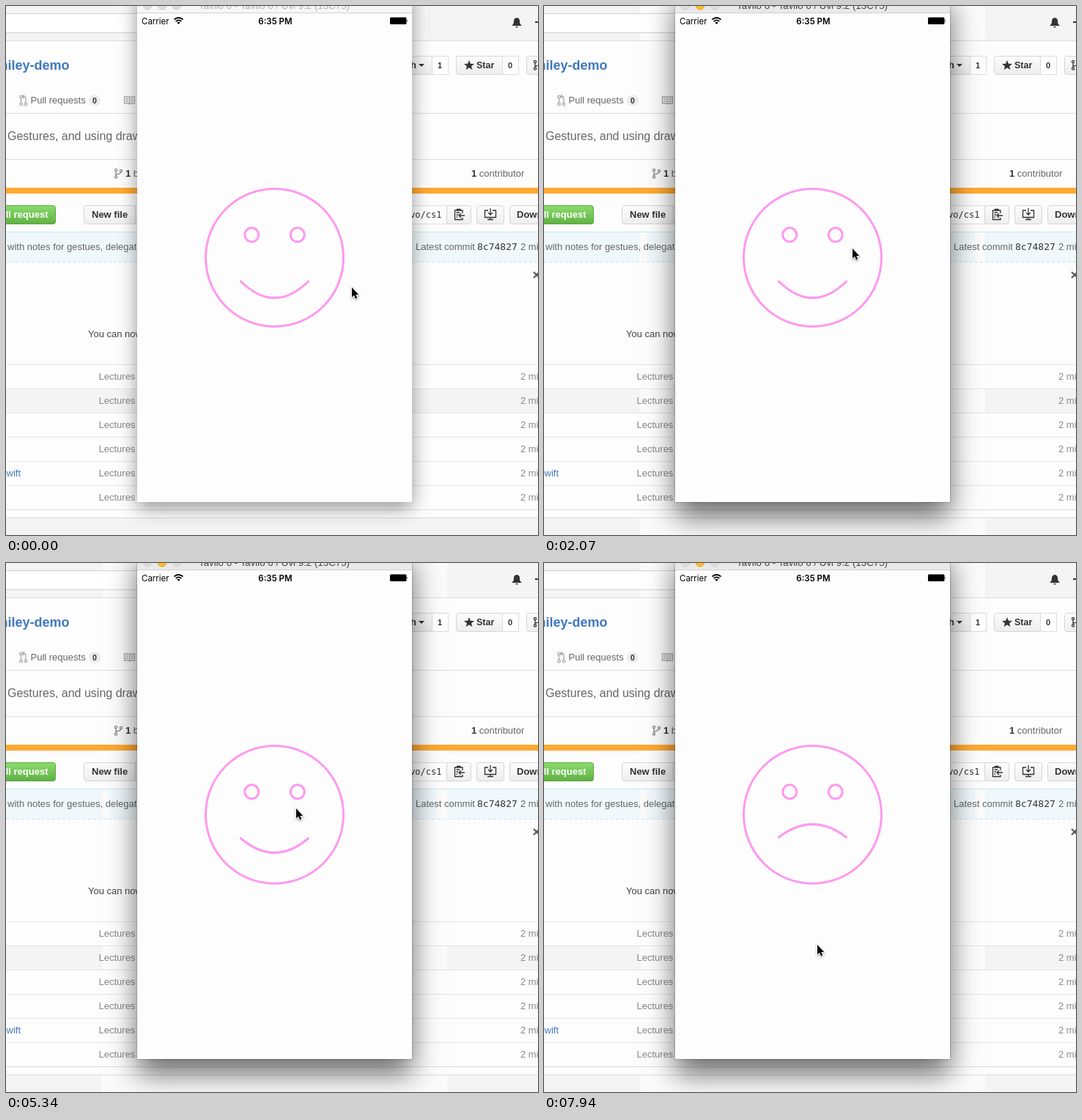
Recreate the animation shown at these times as an HTML page. Size 726 px wide and 722 px high, loop 8 s.

```html
<!DOCTYPE html>
<html lang="en">
<head>
<meta charset="utf-8">
<title>Smiley gesture demo</title>
<style>
html, body { margin: 0; width: 100%; height: 100%; overflow: hidden; background: #fdfdfd; }
svg { position: absolute; left: 0; top: 0; }
text { font: 13px "Liberation Sans", sans-serif; fill: #666; white-space: pre; }
.b { font-weight: bold; fill: #333; }
.s { font-size: 12px; }
.mono { font-family: "DejaVu Sans Mono", monospace; fill: #333; }
.blue { fill: #4078c0; }
.btn { fill: url(#btn); stroke: #d5d5d5; }
.box { fill: #fff; stroke: #ddd; }
.icon { fill: none; stroke: #333; stroke-width: 1.3; }
.dim { stroke: #aaa; }
.rule { fill: none; stroke: #e5e5e5; }
.status { font: 11.5px Inter, sans-serif; fill: #000; }
.face { fill: none; stroke: #ff98f0; stroke-width: 3; }
#shadow { position: absolute; left: 179px; top: -20px; width: 375px; height: 697px; box-shadow: 0 8px 24px rgba(0,0,0,.42); }
.active #shadow { box-shadow: 0 20px 36px rgba(0,0,0,.58), 0 0 2px rgba(0,0,0,.4); }
#bands, .active .idle { display: none; }
.active #bands { display: inline; }
#bar { fill: #f6f6f6; }
.active #bar { fill: #e9e9e9; }
#title { fill: #b0b0b0; }
.active #title { fill: #444; }
.light { fill: #dcdcdc; stroke: #cfcfcf; }
.active #amber { fill: #ffbd2e; stroke: #e2a21f; }
</style>
</head>
<body>
<svg width="726" height="722">
  <defs>
    <linearGradient id="btn" x2="0" y2="1"><stop stop-color="#fcfcfc"/><stop offset="1" stop-color="#eee"/></linearGradient>
    <linearGradient id="green" x2="0" y2="1"><stop stop-color="#8add6d"/><stop offset="1" stop-color="#60b044"/></linearGradient>
    <g id="branch"><path d="M2 3V10M9 4Q9 7 2 8"/><circle cx="2" cy="2" r="1.6"/><circle cx="9" cy="3" r="1.6"/><circle cx="2" cy="11.5" r="1.6"/></g>
  </defs>

  <!-- browser toolbar -->
  <path fill="#f4f4f4" d="M0 0H726V47H0ZM0 699H726V722H0ZM0 523H726V555H0Z"/>
  <path fill="#f0f8fb" d="M0 309H726V349H0Z"/>
  <path id="bands" fill="#fbfbfb" d="M131 0H602V47H131ZM131 523H602V555H131ZM131 699H602V722H131ZM131 309H140V349H131ZM588 309H602V349H588Z"/>
  <path class="idle" fill="#f8f8f8" d="M152 0H575V47H152Z"/>
  <rect class="box" x="-5" y="10.500" width="220" height="26" style="stroke:#d0d0d0"/>
  <path d="M690 27Q693 25 693 20.500Q693 16.500 697 16Q701 16.500 701 20.500Q701 25 704 27ZM695 28H699Q697 31 695 28Z" fill="#333"/>
  <path d="M722 22H726" stroke="#333" stroke-width="2"/>

  <!-- repository header -->
  <text class="b blue" x="86.500" y="87" text-anchor="end" style="font-size:18px;fill:#4078c0">smiley-demo</text>
  <path class="rule" d="M0 47.500H726M0 146.500H726M0 209.500H726M0 687.500H726M0 698.500H726" style="stroke:#ddd"/>
  <rect class="btn" x="500.500" y="68.500" width="81" height="25" rx="3"/>
  <rect class="box" x="581.500" y="68.500" width="22" height="25"/>
  <rect class="btn" x="614.500" y="68.500" width="63" height="25" rx="3"/>
  <rect class="box" x="677.500" y="68.500" width="22" height="25"/>
  <rect class="btn" x="710.500" y="68.500" width="40" height="25" rx="3"/>
  <text class="b" x="560" y="85" text-anchor="end">Unwatch</text>
  <path d="M563 79H571L567 83Z" fill="#333"/>
  <text class="b s" x="589" y="85" style="font-size:11px">1</text>
  <path d="M632 74L633.800 78.800 639 79 635 82.200 636.400 87 632 84.200 627.600 87 629 82.200 625 79 630.200 78.800Z" fill="#333"/>
  <text class="b" x="642" y="85" style="font-size:12.500px">Star</text>
  <text class="b s" x="685" y="85" style="font-size:11px">0</text>
  <use href="#branch" class="icon" x="720" y="74"/>

  <path class="icon dim" d="M20.500 126V132M27 132V125Q27 123.500 25 123.500H23M25 121L22.500 123.500 25 126"/>
  <g class="icon dim"><circle cx="20.500" cy="124" r="1.800"/><circle cx="20.500" cy="134" r="1.800"/><circle cx="27" cy="134" r="1.800"/></g>
  <text x="33.500" y="133">Pull requests</text>
  <rect x="113" y="121.500" width="16" height="15" rx="7.500" fill="#ebebeb"/>
  <text class="b" x="118" y="133" style="font-size:10.500px">0</text>
  <path class="icon dim" d="M161.500 124H167L168.500 125 170 124H175.500V133H170L168.500 134 167 133H161.500ZM168.500 125V133M163 127H167M163 130H167M170 127H174M170 130H174"/>
  <text x="2" y="183" style="font-size:16px">Gestures, and using drawing</text>

  <!-- summary and buttons -->
  <use href="#branch" class="icon" style="stroke:#888" x="148" y="222"/>
  <text x="163" y="233"><tspan class="b">1</tspan> branch</text>
  <text x="635" y="233"><tspan class="b">1</tspan> contributor</text>
  <path fill="#ffa933" d="M0 248H726V256H0Z"/>
  <rect x="-40" y="272.500" width="107.500" height="25" rx="3" fill="url(#green)" stroke="#5ca941"/>
  <text class="b" x="57.500" y="289" text-anchor="end" style="fill:#fff">New pull request</text>
  <rect class="btn" x="106.500" y="272.500" width="70" height="25" rx="3"/>
  <rect class="btn" x="176.500" y="272.500" width="70" height="25"/>
  <text class="b" x="117" y="289">New file</text>
  <rect class="box" x="500.500" y="272.500" width="101" height="25"/>
  <text class="mono s" x="594.500" y="289" text-anchor="end">vo/cs1</text>
  <rect class="btn" x="601.500" y="272.500" width="33" height="25" rx="3"/>
  <rect class="btn" x="642.500" y="272.500" width="37" height="25" rx="3"/>
  <rect class="btn" x="687.500" y="272.500" width="80" height="25" rx="3"/>
  <path class="icon" d="M623 283V279H612.500V291.500H623V289M615.500 279V277.500H620V279M614.500 282H619M614.500 285H617M614.500 288H616M626 286H618M621 283L618 286 621 289"/>
  <path class="icon" d="M658 279H653.500V288.500H668.500V279H664M661 276V285M658 282L661 285 664 282M661 289V291M657 291.500H665"/>
  <text class="b" x="697" y="289">Download</text>

  <!-- commit bar and file list -->
  <path d="M0 308.500H726" stroke="#c9e6f2"/>
  <path d="M0 349.500H726" stroke="#c9e2ec" stroke-dasharray="4 3"/>
  <text x="2" y="333">with notes for gestues, delegation</text>
  <text x="559" y="333">Latest commit</text>
  <text class="mono" x="643" y="333">8c74827</text>
  <text x="702" y="333">2 minutes ago</text>
  <path d="M720 363L728 371M720 371L728 363" stroke="#555" stroke-width="2"/>
  <text x="112" y="452" style="fill:#444">You can now</text>
  <g id="rows"></g>
  <text class="blue" x="20" y="642" text-anchor="end" style="fill:#4078c0">View.swift</text>
</svg>

<div id="shadow"></div>

<svg width="726" height="722">
  <!-- phone window -->
  <path id="bar" d="M179 0H554V10H179Z"/>
  <path d="M179 9.500H554" stroke="#d2d2d2"/>
  <circle class="light" cx="193" cy="-.5" r="5.500"/>
  <circle class="light" id="amber" cx="213" cy="-.5" r="5.500"/>
  <circle class="light" cx="233" cy="-.5" r="5.500"/>
  <text id="title" x="366" y="4" text-anchor="middle" style="font-size:13.300px">Tavilo 6 - Tavilo 6 / Uvi 9.2 (13C75)</text>
  <path fill="#fdfdfd" d="M179 10H554V677H179Z"/>
  <text class="status" x="185" y="24.500">Carrier</text>
  <g fill="none" stroke="#000" stroke-width="1.700"><path d="M229.500 18.500Q235.500 13.500 241.500 18.500M231.700 21Q235.500 17.800 239.300 21"/></g>
  <path d="M233.300 22.500Q235.500 20.800 237.700 22.500L235.500 25Z"/>
  <text class="status" x="367.500" y="24.500" text-anchor="middle" style="font-weight:600">6:35 PM</text>
  <rect x="524" y="15.500" width="22.500" height="9.500" rx="1.500"/>
  <path d="M547.300 18.500Q549 20.200 547.300 22Z"/>

  <g class="face">
    <circle cx="366.500" cy="343.500" r="94"/>
    <circle cx="335.300" cy="312.300" r="9.500"/>
    <circle cx="397.800" cy="312.300" r="9.500"/>
    <path id="mouth"/>
  </g>
  <g id="cursor">
    <path d="M0 0V13.500L3 10.700 5 15.500 7.300 14.500 5.300 10H9.300Z" stroke="#fff" stroke-width="2" style="filter:drop-shadow(0 1px 1px rgba(0,0,0,.4))"/>
    <path d="M0 0V13.500L3 10.700 5 15.500 7.300 14.500 5.300 10H9.300Z"/>
  </g>
</svg>

<script>
const $ = id => document.getElementById(id);

for (let i = 0; i < 6; i++) {
  const y = 489.5 + i * 33;
  $('rows').innerHTML += `<path class="rule" d="M0 ${y}H726"/>
    <text x="126.500" y="${y + 20.5}" style="fill:#888">Lectures</text>
    <text x="702" y="${y + 20.5}" style="fill:#888">2 minutes ago</text>`;
}

// Each burst: start ms, end ms, steps, then [step, x, y, mouth bend] poses.
const bursts = [
  [90, 210, 2, [2, 472, 389, 23.5]],
  [800, 1310, 9, [9, 428, 343, 23.5]],
  [1480, 2070, 9, [9, 421, 331, 23.5]],
  [2250, 2600, 6, [6, 422, 306, 23.5]],
  [2860, 2920, 2, [2, 420, 315, 23.5]],
  [3160, 3570, 6, [3, 419, 311, 23], [6, 419, 301, 23.5]],
  [3780, 3780, 1, [1, 419, 300, 23.5]],
  [4080, 4250, 4, [4, 418, 310, 22.8]],
  [4640, 5400, 12, [11, 396, 335, 20.5], [12, 395, 341, 20]],
  [5450, 6250, 11, [11, 376, 560, -1.5]],
  [6340, 7140, 11, [2, 375, 604, -5.5], [4, 374, 631, -8], [9.25, 373, 316, 23.5], [11, 373, 211, 23.5]],
  [7320, 7940, 10, [2, 373, 114, 23.5], [10, 373, 521, -18.5]]
];

function poseAt(t) {
  let pose = [472, 384, 23.5];
  for (const [start, end, steps, ...keys] of bursts) {
    if (t < start) break;
    const gap = (end - start) / (steps - 1) || 1;
    const step = Math.min(steps, Math.floor((t - start) / gap + 1e-6) + 1);
    let from = 0;
    for (const [at, ...next] of keys) {
      const p = Math.min(1, (step - from) / (at - from));
      pose = pose.map((v, i) => v + (next[i] - v) * p);
      if (step <= at) break;
      from = at;
    }
  }
  return pose;
}

function draw() {
  const t = performance.now() % 8000;
  const [x, y, bend] = poseAt(t);
  const control = 375 + bend / 0.75;
  document.body.className = t < 350 ? '' : 'active';
  $('mouth').setAttribute('d', `M319.500 375C351 ${control} 382 ${control} 413.500 375`);
  $('cursor').setAttribute('transform', `translate(${Math.round(x)} ${Math.round(y)})`);
  requestAnimationFrame(draw);
}
draw();
</script>
</body>
</html>
```
